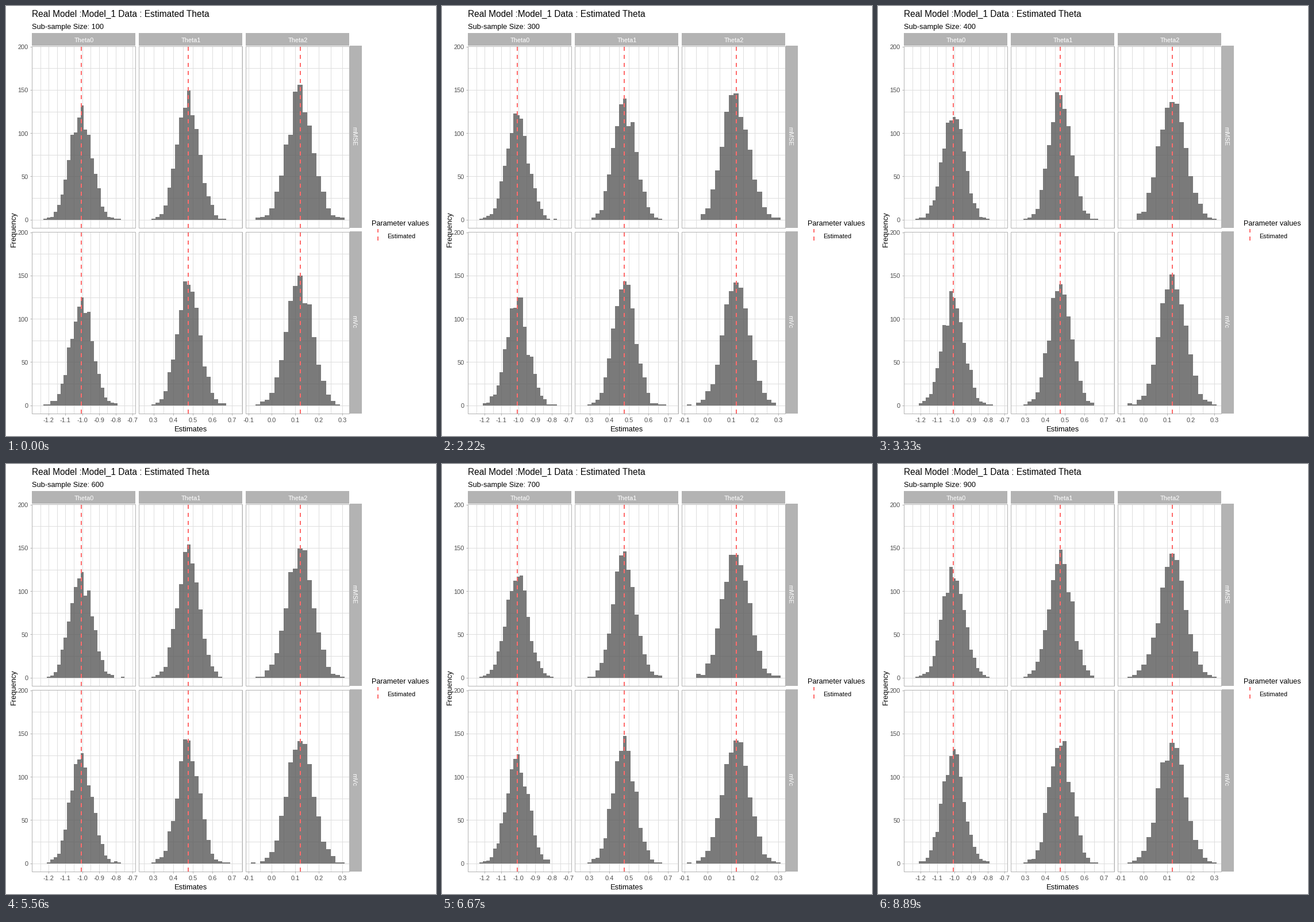
Write a matplotlib script that moves like this. It is 748 by 748 pixels and loops after 10 s.

```python
import numpy as np
import matplotlib.pyplot as plt
from matplotlib.animation import FuncAnimation
from matplotlib.patches import Rectangle

SIDE, DPI = 748, 88
GRID, EDGE, RED = "#DEDEDE", "#B3B3B3", "#FF6A6A"
BIN, SAMPLES, NOISE = 0.02, 1000, 0.6
PANEL_W, PANEL_H = 180, 316
PX_PER_COUNT = 1.504
STATES = 9

# left side, outer bin edges, mean and spread, marked estimate, labelled ticks
COLUMNS = [
    dict(left=45.5, lo=-1.27, hi=-0.71, mean=-1.005, sd=0.066, est=-1.005,
         tick=-1.2, n=6),
    dict(left=231.5, lo=0.25, hi=0.73, mean=0.478, sd=0.056, est=0.478,
         tick=0.3, n=5),
    dict(left=417.5, lo=-0.09, hi=0.31, mean=0.12, sd=0.056, est=0.122,
         tick=-0.1, n=5),
]
ROWS = [("mMSE", 69.5), ("mVc", 392.5)]

plt.rcParams["font.family"] = "Liberation Sans"
fig = plt.figure(figsize=(SIDE / DPI, SIDE / DPI), dpi=DPI, facecolor="white")
ax = fig.add_axes([0, 0, 1, 1])
ax.set(xlim=(0, SIDE), ylim=(SIDE, 0))
ax.axis("off")


def pt(px):
    return px * 72 / DPI


def label(x, y, text, size, color="black", ha="left", rotation=0):
    return ax.text(x, y, text, fontsize=pt(size), color=color, ha=ha,
                   va="baseline", rotation=rotation, rotation_mode="anchor")


def line(x, y, color, width=1, **kw):
    ax.plot(x, y, color=color, lw=pt(width), solid_capstyle="butt",
            dash_capstyle="butt", **kw)


def dashed(x, bottom, top):
    line([x, x], [bottom, top], RED, 2, ls=(0, (3.5, 3.5)), zorder=4)


def box(x, y, w, h, **kw):
    ax.add_patch(Rectangle((x, y), w, h, **kw))


def to_x(col, value):
    """Pixel position of a value; the axis reaches 5 % past the bins."""
    span = col["hi"] - col["lo"]
    return col["left"] + PANEL_W * ((value - col["lo"]) / span + 0.05) / 1.1


def to_y(top, count):
    return top + PANEL_H - 14 - count * PX_PER_COUNT


def bin_edges(col):
    return np.linspace(col["lo"], col["hi"],
                       round((col["hi"] - col["lo"]) / BIN) + 1)


def counts(col, seed):
    """Bar heights: a normal curve with seeded sampling noise."""
    x = bin_edges(col)[:-1] + BIN / 2
    curve = np.exp(-0.5 * ((x - col["mean"]) / col["sd"]) ** 2)
    curve *= SAMPLES / curve.sum()
    noise = np.random.default_rng(seed).standard_normal(len(x))
    return np.maximum(np.round(curve + NOISE * np.sqrt(curve) * noise), 0)


def draw_panel(col, top):
    left, bottom = col["left"], top + PANEL_H
    right, zero = left + PANEL_W, to_y(top, 0)
    for count in range(0, 200, 25):
        y = to_y(top, count)
        line([left, right], [y, y], GRID, zorder=1)
    for k in range(-1, 2 * col["n"]):
        x = to_x(col, col["tick"] + 0.05 * k)
        if left < x < right:
            line([x, x], [top, bottom], GRID, zorder=1)
    edges = to_x(col, bin_edges(col))
    bars = ax.stairs(np.full(len(edges) - 1, zero), edges, baseline=zero,
                     fill=True, color="#595959", alpha=0.8, lw=0, zorder=3)
    bars.set_antialiased(False)
    dashed(to_x(col, col["est"]), bottom, top)
    box(left, top, PANEL_W, PANEL_H, fill=False, ec=EDGE, lw=pt(1), zorder=5)
    return bars, col, top


panels = [draw_panel(col, top) for _, top in ROWS for col in COLUMNS]

for i, col in enumerate(COLUMNS):
    box(col["left"] - 0.5, 47, PANEL_W, 22, fc=EDGE, lw=0)
    label(col["left"] + PANEL_W / 2, 63, f"Theta{i}", 11, "white", "center")
    for k in range(col["n"]):
        value = round(col["tick"] + 0.1 * k, 1)
        x = to_x(col, value)
        line([x, x], [708, 712], EDGE)
        label(x, 724, f"{value + 0.0:.1f}", 11, "#4D4D4D", "center")

for name, top in ROWS:
    box(598, top - 0.5, 21, PANEL_H + 1, fc=EDGE, lw=0)
    label(602, top + PANEL_H / 2 - 1, name, 11, "white", "center", 270)
    for count in range(0, 201, 50):
        y = to_y(top, count)
        line([42, 45.5], [y, y], EDGE)
        label(39, y + 4.5, str(count), 11, "#4D4D4D", "right")

label(45, 19, "Real Model :Model_1 Data : Estimated Theta", 15.55)
subtitle = label(45, 40, "", 12.8)
label(321.5, 740, "Estimates", 13, ha="center")
label(16.5, 388.5, "Frequency", 13, ha="center", rotation=90)
label(636.5, 382, "Parameter values", 12.75)
label(663, 404, "Estimated", 11)
dashed(647, 408, 388)


def update(step):
    size = 100 * (min(step // 11, STATES - 1) + 1)
    subtitle.set_text(f"Sub-sample Size: {size}")
    for i, (bars, col, top) in enumerate(panels):
        bars.set_data(values=to_y(top, counts(col, size + i)))


anim = FuncAnimation(fig, update, frames=100, interval=100, repeat=True,
                     repeat_delay=0, init_func=lambda: update(0))
plt.show()
```
